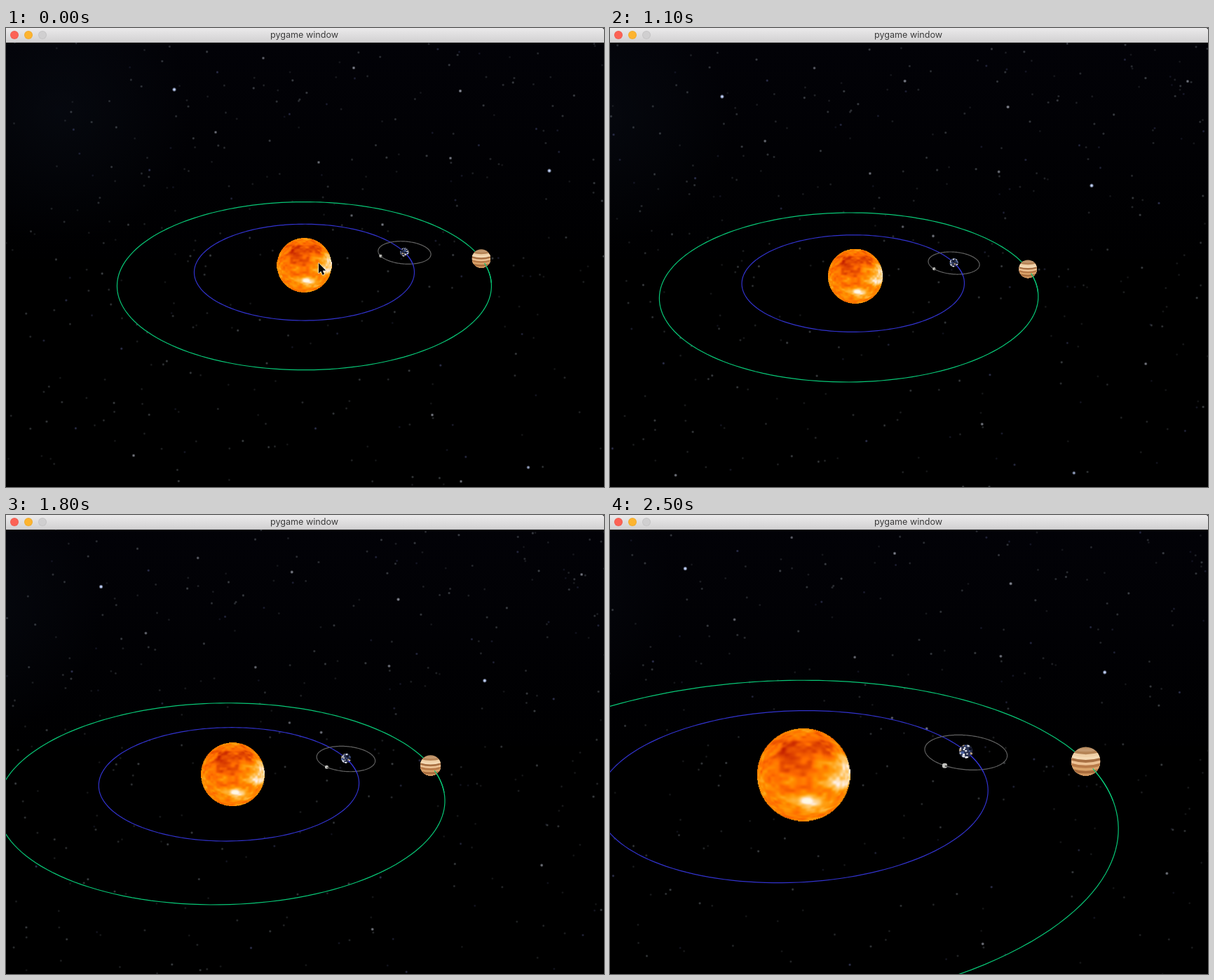
These frames come from a looping animation (853x656 px, 2600 ms). An HTML page with a canvas:

```html
<!DOCTYPE html>
<html lang="en">
<head>
<meta charset="utf-8">
<title>pygame window</title>
<style>
html, body { margin: 0; width: 100%; height: 100%; overflow: hidden; background: #000; }
canvas { position: absolute; left: 0; top: 0; display: block; }
.bar {
  position: absolute; left: 0; top: 0; width: 851px; padding-right: 2px; height: 20px;
  background: linear-gradient(#ebeaeb, #d2d1d2); border-bottom: 1px solid #b8b7b8;
  border-radius: 0 3px 0 0;
  font: 12.6px/20px Inter, "Liberation Sans", sans-serif; color: #3c3c3c; text-align: center;
}
.bar i { position: absolute; top: 4px; width: 12px; height: 12px; border-radius: 50%; box-sizing: border-box; border: 1px solid rgba(0,0,0,.05); }
</style>
</head>
<body>
<canvas id="view" width="853" height="656"></canvas>
<div class="bar">
  <i style="left:6px;background:#fc6255"></i>
  <i style="left:26px;background:#fdb42f"></i>
  <i style="left:46px;background:#d0cfd0"></i>
  pygame window
</div>
<script>
const ctx = document.getElementById('view').getContext('2d');
const W = 853, H = 656, CX = 426.5, CY = 338, FOCAL = 768;
const LOOP = 2600, STEP = 100, TAU = Math.PI * 2, RAD = Math.PI / 180;
const TILT_S = 0.5105, TILT_C = 0.8598;

// lengths are in units of the sun's distance; angles in degrees, speeds per second
const SKY = 3.26, SUN = [-.0013, .0013, 1], SUN_SIZE = .0508;
const earth = { rx: .2022, rz: .1715, size: .0084, start: 16.66, speed: .9, color: '#3233cf' };
const giant = { rx: .3369, rz: .287, size: .01755, start: 4.95, speed: .55, color: '#08c877' };
const moon = { rx: .0505, rz: .045, size: .003, start: -161, speed: 12.8, color: '#626262' };

function seeded(seed) {
  return () => {
    seed = (seed + 0x6D2B79F5) | 0;
    let n = Math.imul(seed ^ seed >>> 15, 1 | seed);
    n = n + Math.imul(n ^ n >>> 7, 61 | n) ^ n;
    return ((n ^ n >>> 14) >>> 0) / 4294967296;
  };
}

const mix = (a, b, k) => a + (b - a) * k;
const ramp = (t, from, to) => Math.min(1, Math.max(0, (t - from) / (to - from)));
const easeOut = k => 1 - (1 - k) ** 2;

// drag sideways, then down, then scroll in at a constant ratio
function cameraAt(t) {
  const yaw = .114 * easeOut(ramp(t, 600, 1400));
  const pitch = .041 * ramp(t, 800, 1400);
  const zoom = Math.cos(yaw) * (1 - Math.exp(-.00054 * Math.max(0, t - 1530)));
  return { ys: Math.sin(yaw), yc: Math.cos(yaw), ps: Math.sin(pitch), pc: Math.cos(pitch), zoom };
}

// yaw, then dolly, then pitch; returns screen x, y and pixels per unit
function project(cam, [x, y, z]) {
  const x1 = x * cam.yc - z * cam.ys;
  const z1 = z * cam.yc + x * cam.ys - cam.zoom;
  const y2 = y * cam.pc + z1 * cam.ps;
  const scale = FOCAL / (z1 * cam.pc - y * cam.ps);
  return [CX + x1 * scale, CY + y2 * scale, scale];
}

function orbitPoint(body, angle, center = SUN) {
  const far = body.rz * Math.sin(angle);
  return [center[0] + body.rx * Math.cos(angle), center[1] - far * TILT_S, center[2] + far * TILT_C];
}

const angleAt = (body, t) => (body.start + body.speed * t / 1000) * RAD;

function drawArc(cam, body, from, to, center) {
  const n = Math.max(6, Math.ceil(Math.abs(to - from) * 30));
  ctx.beginPath();
  for (let i = 0; i <= n; i++) {
    const [x, y] = project(cam, orbitPoint(body, mix(from, to, i / n), center));
    ctx.lineTo(x, y);
  }
  ctx.strokeStyle = body.color;
  ctx.lineWidth = 1.2;
  ctx.stroke();
}

// brightest stars: x, y, strength
const BRIGHT = [
  [240, 88, 1], [775, 204, 1], [745, 628, .75], [648, 90, .65], [496, 57, .6], [182, 611, .55],
  [634, 186, .55], [608, 553, .55], [537, 281, .55], [928, 42, .55], [857, 470, .55], [299, 149, .5],
  [446, 192, .5], [649, 648, .5], [493, 268, .45], [367, 43, .45]
];

const onSky = (x, y) => [(x - CX) * SKY / FOCAL, (y - CY) * SKY / FOCAL, SKY];
const star = (x, y, a, tint) => ({ p: onSky(x, y), a, r: 1.8 + a * 1.4, tint });

const rnd = seeded(41);
const stars = BRIGHT.map(([x, y, a]) => star(x, y, a, a > .7 ? '195,212,255' : '205,210,225'));
for (let i = 0; i < 520; i++) {
  const x = mix(-30, 990, rnd()), y = mix(-70, 690, rnd() ** 1.35);
  stars.push(star(x, y, .1 + .2 * rnd() ** 2, rnd() < .15 ? '150,160,255' : '200,212,222'));
}

function glow(x, y, r, tint, alpha, core = 0) {
  const g = ctx.createRadialGradient(x, y, 0, x, y, r);
  g.addColorStop(core, `rgba(${tint},${alpha})`);
  g.addColorStop(1, `rgba(${tint},0)`);
  ctx.fillStyle = g;
  ctx.fillRect(x - r, y - r, r * 2, r * 2);
}

function drawSky(cam) {
  ctx.fillStyle = '#000';
  ctx.fillRect(0, 0, W, H);
  const shade = ctx.createLinearGradient(0, 20, 0, 330);
  shade.addColorStop(0, '#020207');
  shade.addColorStop(1, '#000001');
  ctx.fillStyle = shade;
  ctx.fillRect(0, 20, W, 310);
  const [x, y] = project(cam, onSky(75, 120));
  glow(x, y, 190, '12,18,28', .4);
  for (const s of stars) {
    const [sx, sy] = project(cam, s.p);
    glow(sx, sy, s.r, s.tint, s.a, .3);
  }
}

function noise(x, y) {
  const hash = (i, j) => {
    const v = Math.sin(i * 127.1 + j * 311.7) * 43758.5453;
    return v - Math.floor(v);
  };
  const i = Math.floor(x), j = Math.floor(y);
  const smooth = k => k * k * (3 - 2 * k);
  const u = smooth(x - i), v = smooth(y - j);
  return mix(mix(hash(i, j), hash(i + 1, j), u), mix(hash(i, j + 1), hash(i + 1, j + 1), u), v);
}

// dark red through orange to near white
const fire = v => [mix(185, 255, ramp(v, 0, .4)), mix(20, 250, ramp(v, 0, 1.05)), 228 * ramp(v, .55, 1) ** 1.5];

const blob = (x, y, w, h) => Math.exp(-((x / w) ** 2) - (y / h) ** 2);

function makeSun(n) {
  const c = document.createElement('canvas');
  c.width = c.height = n;
  const g = c.getContext('2d'), img = g.createImageData(n, n);
  for (let py = 0; py < n; py++) for (let px = 0; px < n; px++) {
    const x = (px + .5) / n * 2 - 1, y = (py + .5) / n * 2 - 1, d = x * x + y * y;
    if (d > 1) continue;
    const bulge = 1 / (.55 + .45 * Math.sqrt(1 - d));
    const u = x * bulge + 9, w = y * bulge + 5;
    const warp = noise(u * 3, w * 3) * 1.2;
    const grain = (noise(u * 3 + warp, w * 4.5) - .5) * .28 + (noise(u * 8, w * 11) - .5) * .2;
    const cool = .34 * blob(x + .35, y + .38, .38, .32) + .18 * blob(x - .2, y + .55, .4, .25);
    const hot = .5 * blob(x - .88, y + .08, .24, .3) + .3 * blob(x - .6, y - .2, .3, .15) + .5 * blob(x - .12, y - .58, .32, .14);
    img.data.set([...fire(.5 + grain - cool + hot), 255], (py * n + px) * 4);
  }
  g.putImageData(img, 0, 0);
  return c;
}
const sunSkin = makeSun(134);

function drawSun(cam) {
  const [x, y, s] = project(cam, SUN), r = SUN_SIZE * s;
  ctx.drawImage(sunSkin, x - r, y - r, r * 2, r * 2);
}

function clipped(x, y, r, paint) {
  ctx.save();
  ctx.translate(x, y);
  ctx.beginPath();
  ctx.arc(0, 0, r, 0, TAU);
  ctx.clip();
  ctx.scale(r, r);
  paint();
  ctx.restore();
}

const BANDS = ['#b88d62', '#c49970', '#b58456', '#efcfa6', '#f4d9b4', '#a87043', '#edc294', '#b87a48', '#d9a36a', '#a86c3d', '#cf965f'];

function drawGiant(x, y, r) {
  clipped(x, y, r, () => BANDS.forEach((color, i) => {
    const top = -1.2 + i * .19;
    ctx.beginPath();
    ctx.moveTo(-1, top);
    ctx.quadraticCurveTo(0, top + .3, 1, top);
    ctx.lineTo(1, 2);
    ctx.lineTo(-1, 2);
    ctx.fillStyle = color;
    ctx.fill();
  }));
}

const CLOUDS = ['#ffffff', '#d8dce6', '#b9a283', '#0a0d20', '#4a62a0'];
const clouds = Array.from({ length: 75 }, (_, i) => ({
  lon: rnd() * TAU, lat: Math.asin(rnd() * 2 - 1), size: .1 + rnd() * .13, color: CLOUDS[i % CLOUDS.length]
}));

function drawEarth(x, y, r, t) {
  clipped(x, y, r, () => {
    ctx.fillStyle = '#28304e';
    ctx.fillRect(-1, -1, 2, 2);
    for (const c of clouds) {
      const lon = c.lon + t * .0006;
      if (Math.cos(lon) < 0) continue;
      ctx.fillStyle = c.color;
      ctx.fillRect(Math.sin(lon) * Math.cos(c.lat) - c.size, Math.sin(c.lat) - c.size, c.size * 2, c.size * 1.6);
    }
  });
}

function drawMoon(x, y, r) {
  clipped(x, y, r, () => {
    ctx.fillStyle = '#c4c4c0';
    ctx.fillRect(-1, -1, 2, 2);
    ctx.fillStyle = '#5c5c5a';
    ctx.fillRect(.1, -.1, .9, .6);
  });
}

const arrow = new Path2D('M0 0V14.5L3.3 11.6 5.6 16.8 8 15.8 5.8 10.8 10.2 10.6Z');

function drawCursor(x, y) {
  ctx.save();
  ctx.translate(x, y);
  ctx.lineJoin = 'round';
  ctx.strokeStyle = 'rgba(255,255,255,.75)';
  ctx.lineWidth = 1.4;
  ctx.stroke(arrow);
  ctx.fillStyle = '#000';
  ctx.fill(arrow);
  ctx.restore();
}

function drawPlanet(cam, body, t, paint) {
  const a = angleAt(body, t);
  const [x, y, s] = project(cam, orbitPoint(body, a));
  paint(x, y, body.size * s, t);
  // the near part of the path passes in front of the ball
  drawArc(cam, body, a - .3, a - body.size / body.rz);
}

function draw(t) {
  const cam = cameraAt(t);
  drawSky(cam);
  drawArc(cam, giant, 0, TAU);
  drawArc(cam, earth, 0, TAU);
  drawSun(cam);

  const home = orbitPoint(earth, angleAt(earth, t));
  drawArc(cam, moon, 0, TAU, home);
  drawPlanet(cam, earth, t, drawEarth);
  const [mx, my, ms] = project(cam, orbitPoint(moon, angleAt(moon, t), home));
  drawMoon(mx, my, moon.size * ms);

  drawPlanet(cam, giant, t, drawGiant);
  if (t < 700) drawCursor(446, 336);
}

const begin = performance.now();
function tick() {
  const t = (performance.now() - begin) % LOOP;
  draw(Math.floor(t / STEP) * STEP);
  requestAnimationFrame(tick);
}
tick();
</script>
</body>
</html>
```
